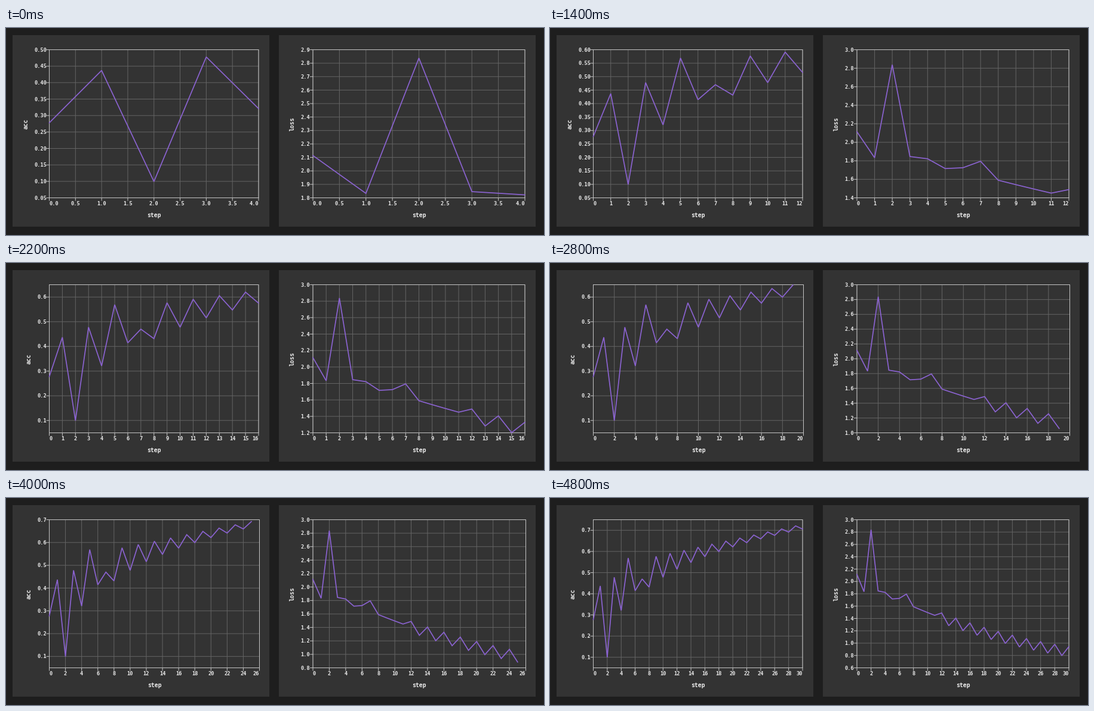
Animation, 901 px wide and 348 px high, one loop 5 s. Source, as a matplotlib script:

```python
import math
import numpy as np
import matplotlib.pyplot as plt
from matplotlib.animation import FuncAnimation
from matplotlib.patches import Rectangle

W, H, DPI = 901, 348, 100
PX = 72 / DPI
FRAMES, INTERVAL = 25, 200

BACK, PANEL, GRID = "#1e1e1e", "#333333", "#646464"
FRAME, INK, CURVE = "#c4c4c4", "#ebebeb", "#8b63d1"
TOP, BOTTOM = 36.5, 285.5
LABEL_SIZE, TITLE_SIZE, CHAR_W = 8.6, 9.8, 5.1

# rough first steps; afterwards both curves zigzag along a smooth trend
ACC_START = [.278, .437, .0995, .478, .321, .569, .4145, .47]
LOSS_START = [2.114, 1.833, 2.838, 1.846, 1.822, 1.716, 1.725, 1.795]


def acc_rule(n):
    return .512 + .0072 * n if n % 2 else .2075 * math.log(n)


def loss_rule(n):
    m = n - 3
    swing = .082 * (-1) ** n if n >= 12 else 0
    return 1.85 - .0555 * m + .0007 * m * m + swing


def series(start, rule, last):
    return np.array(start + [rule(n) for n in range(len(start), last + 1)])[:last + 1]


fig = plt.figure(figsize=(W / DPI, H / DPI), dpi=DPI, facecolor=BACK)
ax = fig.add_axes([0, 0, 1, 1])


def tick_step(span, count):
    raw = span / count
    power = 10 ** math.floor(math.log10(raw))
    for limit, factor in ((50, 10), (10, 5), (2, 2)):
        if raw / power >= math.sqrt(limit):
            return power * factor
    return power


def nice(lo, hi):
    """Widen a range to round ends until its step settles."""
    step = None
    while True:
        new = tick_step(hi - lo, 10)
        if step is not None and math.isclose(new, step):
            return lo, hi
        step = new
        lo = math.floor(lo / step + 1e-9) * step
        hi = math.ceil(hi / step - 1e-9) * step


def ticks(lo, hi, count):
    step = tick_step(hi - lo, count)
    first, last = math.ceil(lo / step - 1e-9), math.floor(hi / step + 1e-9)
    digits = max(0, -math.floor(math.log10(step) + 1e-9))
    return [(k * step, f"{k * step:.{digits}f}") for k in range(first, last + 1)]


def line(xs, ys, color, width=1.0, **kw):
    ax.plot(xs, ys, color=color, lw=width * PX, snap=False, **kw)


def label(x, y, text, size=LABEL_SIZE, ha="center", **kw):
    ax.text(x, y, text, color=INK, size=size * PX, ha=ha, va="baseline",
            family="DejaVu Sans Mono", weight="bold", **kw)


def draw_chart(name, values, panel, left, right):
    ax.add_patch(Rectangle((panel, 12), 430, 322, color=PANEL, lw=0))
    last = len(values) - 1
    x_max = nice(0, last)[1]
    lo, hi = nice(values.min(), values.max())
    if x_max > last + 1e-6:
        right += 1.5

    def px(v):
        return left + (right - left) * v / x_max

    def py(v):
        return BOTTOM - (BOTTOM - TOP) * (v - lo) / (hi - lo)

    x_ticks, y_ticks = ticks(0, x_max, 12), ticks(lo, hi, 8)
    for v, _ in x_ticks:
        line([px(v)] * 2, [TOP, BOTTOM], GRID)
    for v, _ in y_ticks:
        line([left, right], [py(v)] * 2, GRID)

    line([left, right, right, left, left], [TOP, TOP, BOTTOM, BOTTOM, TOP], FRAME)
    for i, (v, text) in enumerate(x_ticks):
        x = px(v)
        line([x, x], [BOTTOM, BOTTOM + 4.5], FRAME)
        ha = "left" if i == 0 else "right" if i == len(x_ticks) - 1 else "center"
        label(x, 298, text, ha=ha)
    for v, text in y_ticks:
        y = py(v)
        line([left - 4.5, left], [y, y], FRAME)
        label(left - 4.5, y + 3.1, text, ha="right")

    line(px(np.arange(last + 1)), py(values), CURVE, 1.7, solid_joinstyle="miter")
    label((left + right) / 2, 318, "step", TITLE_SIZE)
    label(left - 16 - CHAR_W * len(y_ticks[0][1]), (TOP + BOTTOM) / 2, name,
          TITLE_SIZE, rotation=90, rotation_mode="anchor")


def update(frame):
    ax.clear()
    ax.set_xlim(0, W)
    ax.set_ylim(H, 0)
    ax.axis("off")
    # two updates arrive within a single interval twice per loop
    last = 4 + frame + (frame >= 2) + (frame >= 22)
    draw_chart("acc", series(ACC_START, acc_rule, last), 11, 72.5, 423)
    draw_chart("loss", series(LOSS_START, loss_rule, last), 457, 514, 869)
    return []


anim = FuncAnimation(fig, update, frames=FRAMES, interval=INTERVAL,
                     init_func=lambda: [], repeat=True, repeat_delay=0)
plt.show()
```
